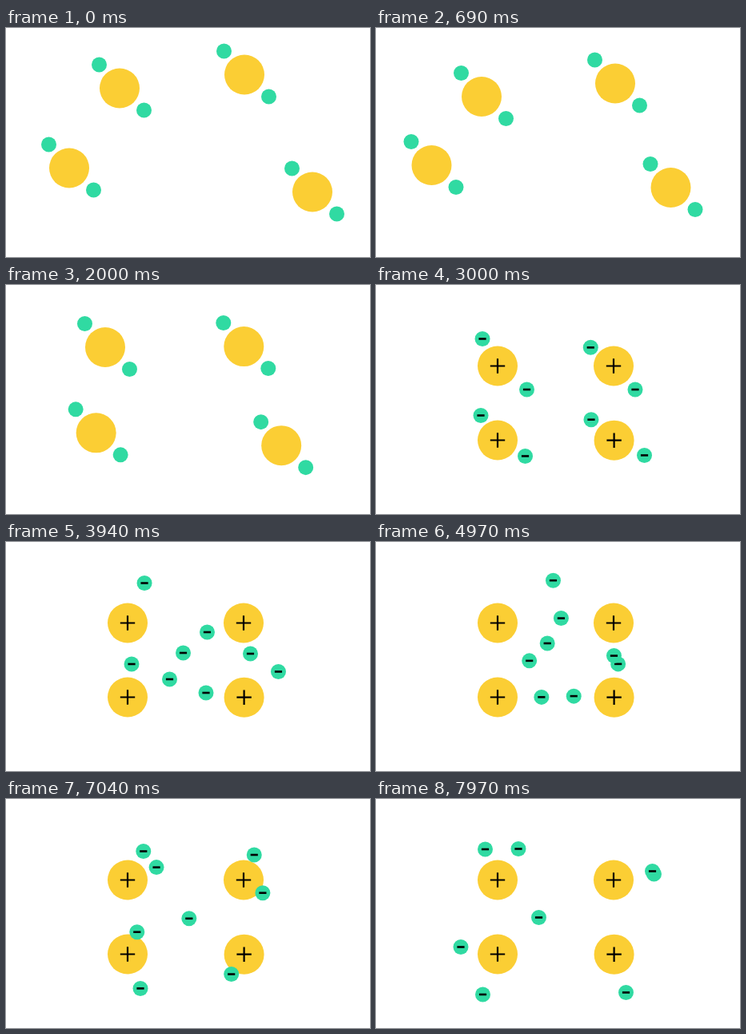
An HTML page that plays this animation: 455 by 287 pixels, repeating every 8000 ms.

```html
<!DOCTYPE html>
<html lang="en">
<head>
<meta charset="utf-8">
<title>Electron sea</title>
<style>
html, body { margin: 0; width: 100%; height: 100%; overflow: hidden; background: #fff; }
svg { display: block; width: 100vw; height: 100vh; }
</style>
</head>
<body>
<svg id="stage" viewBox="0 0 455 287"></svg>
<script>
const LOOP = 8000, WOBBLE = 1080, GATHER = 1290, JOINED = 2860, SIGNS = 2900;
const BOUND = [[-25.5, -29.5], [30.5, 27.5]];
const FREE_TIMES = [JOINED, 3000, 3940, 6030, 7970];

// sway: farthest wobble; bend: control point of the gathering path;
// free: places each of the two electrons drifts through
const atoms = [
  { from: [142, 75.5], sway: [-10, 10.5], bend: [101.5, 69.8], to: [152, 101.5], free: [
    [[133, 67.5], [173, 51.5], [270, 52.5], [345.5, 90.5]],
    [[188.5, 131], [221.5, 139], [199, 108.5], [178, 62.5]]] },
  { from: [298, 58.5], sway: [1, 11], bend: [297, 78.2], to: [297, 101.5], free: [
    [[268.3, 78.3], [251.5, 113], [206.5, 72], [136.5, 63]],
    [[324, 131], [305.5, 140], [299, 138], [347.5, 94]]] },
  { from: [79, 175.5], sway: [-9.5, -3.5], bend: [116.7, 187.5], to: [152, 194.5], free: [
    [[131, 163.5], [157, 153], [207.5, 151], [106, 185.5]],
    [[186.5, 214.5], [204.5, 172], [198, 225.3], [133.5, 245]]] },
  { from: [383, 205.5], sway: [-14.5, -5.5], bend: [340, 201.2], to: [297.6, 194.7], free: [
    [[269, 168.7], [250, 189], [255, 199], [312.5, 242.5]],
    [[335.5, 213.5], [340.5, 162.5], [259, 152], [203.5, 148.5]]] }
];

const add = (a, b, k = 1) => [a[0] + k * b[0], a[1] + k * b[1]];

// smooth curve through timed points (cubic Hermite)
function track(times, pts, t) {
  const last = times.length - 1;
  if (t >= times[last]) return pts[last];
  const i = times.findIndex(v => v > t) - 1;
  const span = times[i + 1] - times[i], u = (t - times[i]) / span;
  const slope = (k, c) => {
    const a = Math.max(k - 1, 0), b = Math.min(k + 1, last);
    return (pts[b][c] - pts[a][c]) / (times[b] - times[a]) * span;
  };
  const u2 = u * u, u3 = u2 * u;
  return [0, 1].map(c =>
    (2 * u3 - 3 * u2 + 1) * pts[i][c] + (u3 - 2 * u2 + u) * slope(i, c) +
    (3 * u2 - 2 * u3) * pts[i + 1][c] + (u3 - u2) * slope(i + 1, c));
}

function nucleusAt({ from, sway, bend, to }, t) {
  if (t < GATHER) {
    const u = Math.min(t / WOBBLE, 1);
    return add(from, sway, Math.sin(Math.PI * u ** 1.55));
  }
  const s = Math.min((t - GATHER) / (JOINED - GATHER), 1), r = 1 - s;
  return [0, 1].map(c => r * r * from[c] + 2 * r * s * bend[c] + s * s * to[c]);
}

function electronAt(atom, n, t) {
  if (t < JOINED) return add(nucleusAt(atom, t), BOUND[n]);
  return track(FREE_TIMES, [add(atom.to, BOUND[n]), ...atom.free[n]], t);
}

const stage = document.getElementById('stage');
const signs = [];

function make(tag, attrs, parent) {
  const el = document.createElementNS(stage.namespaceURI, tag);
  for (const k in attrs) el.setAttribute(k, attrs[k]);
  return parent.appendChild(el);
}

function particle(r, fill, sign, weight) {
  const g = make('g', {}, stage);
  make('circle', { r, fill }, g);
  signs.push(make('path', { d: sign, stroke: '#000', 'stroke-width': weight }, g));
  return g;
}

const parts = [];
for (const atom of atoms) {
  parts.push({ el: particle(25, '#fbce34', 'M-9.2 0H9.2M0-9.2V9.2', 2.2), at: t => nucleusAt(atom, t) });
}
for (const atom of [...atoms].reverse()) {
  for (const n of [1, 0]) {
    parts.push({ el: particle(9.5, '#30daa2', 'M-4.6 0H4.6', 2.6), at: t => electronAt(atom, n, t) });
  }
}

function draw(t) {
  for (const p of parts) p.el.setAttribute('transform', `translate(${p.at(t)})`);
  for (const s of signs) s.setAttribute('visibility', t < SIGNS ? 'hidden' : 'visible');
}

const begin = performance.now();
function tick() {
  draw(Math.max(performance.now() - begin, 0) % LOOP);
  requestAnimationFrame(tick);
}
tick();
</script>
</body>
</html>
```
